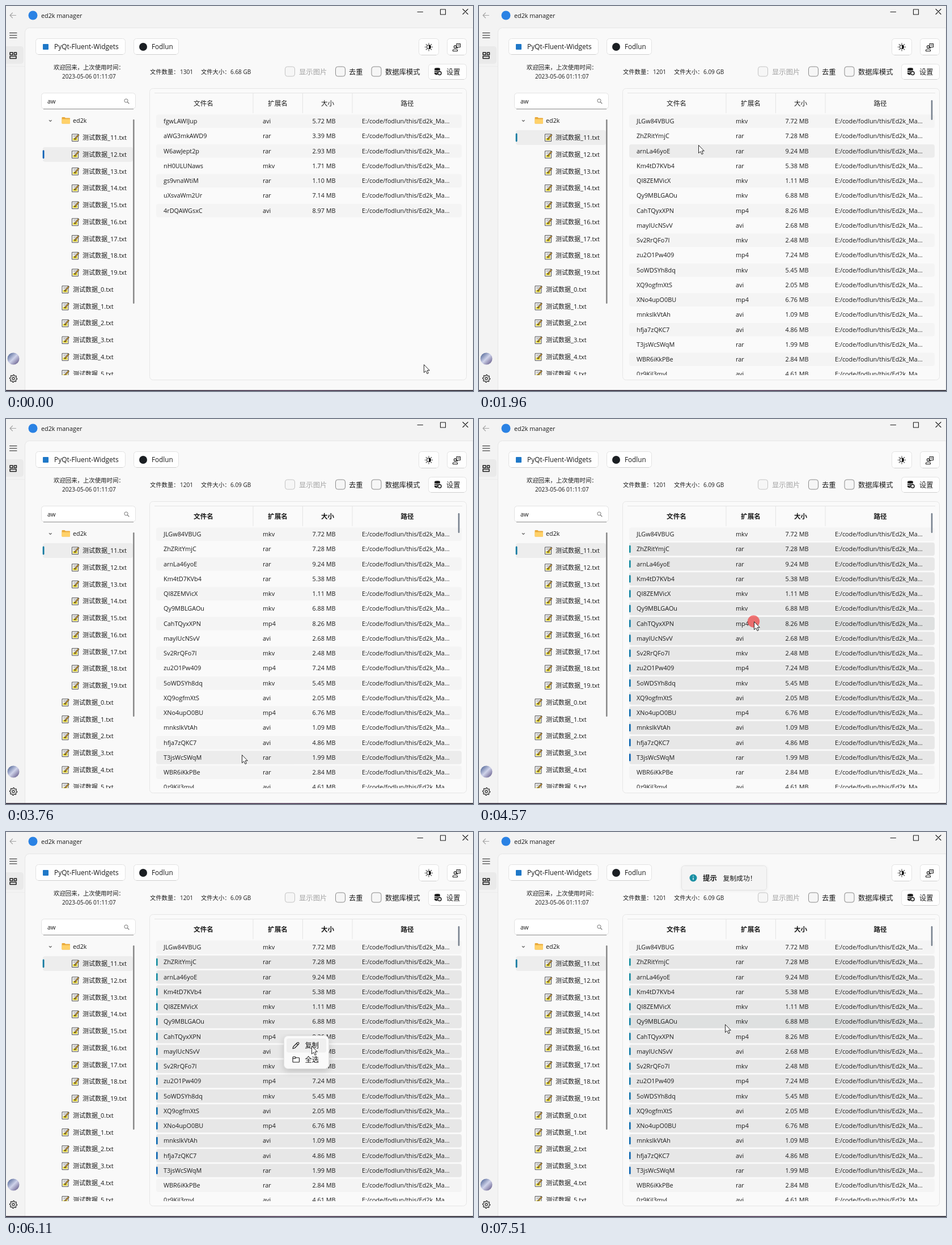
Animation, 824 px wide and 679 px high, one loop 8000 ms. Source, as an HTML page:

```html
<!DOCTYPE html>
<html lang="zh">
<head>
<meta charset="utf-8">
<title>ed2k manager</title>
<style>
html, body { margin: 0; width: 100%; height: 100%; overflow: hidden; background: #f3f3f3; }
svg { display: block; width: 824px; height: 679px; }
text { font-family: "Open Sans", "Noto Sans CJK SC", "Noto Sans CJK JP", "Noto Sans CJK", sans-serif; white-space: pre; }
.line { fill: none; stroke: #1c1c1c; stroke-width: 1.1; stroke-linecap: round; stroke-linejoin: round; }
.btn { fill: #fefefe; stroke: #e3e3e3; }
#panel { filter: drop-shadow(0 4px 6px rgba(0,0,0,.17)); }
#toastBox { filter: drop-shadow(0 1px 2px rgba(0,0,0,.06)); }
</style>
</head>
<body>
<svg id="stage" viewBox="0 0 824 679"></svg>
<script>
const LOOP = 8000, ROW = 26.25, TOP = 190.1, ITEM = 29.75;
const PATH = 'E:/code/fodlun/this/Ed2k_Ma...';
const before = `fgwLAWIJup avi 5.72|aWG3mkAWD9 rar 3.39|W6awJept2p rar 2.93|nH0ULUNaws mkv 1.71
gs9vnaWtiM rar 1.10|uXsvaWm2Ur rar 7.14|4rDQAWGsxC avi 8.97`;
const after = `JLGw84VBUG mkv 7.72|ZhZRitYmjC rar 7.28|arnLa46yoE rar 9.24|Km4tD7KVb4 rar 5.38
QI8ZEMVicX mkv 1.11|Qy9MBLGAOu mkv 6.88|CahTQyxXPN mp4 8.26|mayIUcNSvV avi 2.68
Sv2RrQFo7I mkv 2.48|zu2O1Pw409 mp4 7.24|5oWDSYh8dq mkv 5.45|XQ9ogfmXtS avi 2.05
XNo4upO0BU mp4 6.76|mnkslkVtAh avi 1.09|hfja7zQKC7 avi 4.86|T3jsWcSWqM rar 1.99
WBR6iKkPBe rar 2.84|0z9Kil3mvJ avi 4.61`;

const text = (x, y, s, size = 10.85, more = '') =>
  `<text x="${x}" y="${(y + size * .37).toFixed(2)}" font-size="${size}" fill="#1a1a1a" ${more}>${s}</text>`;
const rect = (x, y, w, h, r, more = '') =>
  `<rect x="${x}" y="${y}" width="${w}" height="${h}" rx="${r}" ${more}/>`;
const line = (d, more = '') => `<path class="line" d="${d}" ${more}/>`;
const disc = (x, y, r, fill, more = '') => `<circle cx="${x}" cy="${y}" r="${r}" fill="${fill}" ${more}/>`;
const button = (x, y, w, h) => rect(x + .5, y + .5, w - 1, h - 1, 5, 'class="btn"') +
  `<path d="M${x + 5} ${y + h - .5}h${w - 10}" stroke="#cfcfcf"/>`;
const mid = 'text-anchor="middle"';

function tableRows(src) {
  return src.split(/[|\n]/).map((r, i) => {
    const [name, ext, size] = r.split(' '), y = 203.2 + ROW * i;
    return text(278, y, name) + text(453, y, ext) + text(540.5, y, size + ' MB') + text(628, y, PATH);
  }).join('');
}

function gear(x, y) {
  let d = '';
  for (let i = 0; i < 32; i++) {
    const a = i * Math.PI / 16, r = i % 4 < 2 ? 6.6 : 5;
    d += (i ? 'L' : 'M') + (x + r * Math.cos(a)).toFixed(1) + ' ' + (y + r * Math.sin(a)).toFixed(1);
  }
  return line(d + 'Z') + disc(x, y, 2.1, 'none', 'class="line"');
}

function sun(x, y) {
  let d = '';
  for (let i = 0; i < 8; i++) {
    const c = Math.cos(i * Math.PI / 4), s = Math.sin(i * Math.PI / 4);
    d += `M${x + 5.6 * c} ${y + 5.6 * s}L${x + 6.6 * c} ${y + 6.6 * s}`;
  }
  return line(d) + disc(x, y, 3.5, 'none', 'class="line"') +
    `<path d="M${x} ${y - 3.5}a3.5 3.5 0 0 1 0 7z" fill="#1c1c1c"/>`;
}

const frame = () =>
  rect(0, 0, 824, 679, 0, 'fill="#f3f3f3"') +
  '<path d="M33.5 679V46.5a8 8 0 0 1 8-8H824V679z" fill="#f9f9f9" stroke="#e6e6e6"/>' +
  rect(0, 677.4, 824, 2, 0, 'fill="url(#strip)"') +
  line('M17.5 16.5H7M11.5 12L7 16.5L11.5 21', 'style="stroke:#a5a5a5"') +
  disc(47.5, 16.5, 8, '#2a82e4') + text(62, 16.7, 'ed2k manager', 10.8) +
  line('M726 10.5H735.5M766.5 6h9v9h-9zM806 5.5L815 14.5M815 5.5L806 14.5') +
  line('M6.5 47.5H19M6.5 51.7H19M6.5 56H19') +
  rect(-4, 71, 35, 31, 5, 'fill="#eaeaea"') + '<path d="M0 106.5H33" stroke="#ebebeb"/>' +
  line('M7 82h5v4h-5zM7 88.5h11v4h-11zM14.5 82h4v4h-4z', 'style="stroke-width:1.5"') +
  disc(13, 622, 10.5, 'url(#avatar)') + gear(13, 657);

const toolbar = () =>
  button(52, 57, 159, 29) + rect(65, 67, 10, 10, 1, 'fill="#1f78c8"') + text(85, 71.7, 'PyQt-Fluent-Widgets', 11.95) +
  button(225, 57, 80, 29) + disc(242, 72, 7, '#1b1f23') + text(257, 71.7, 'Fodlun', 11.7) +
  button(728, 57, 36, 30) + sun(746, 72.3) +
  button(778, 57, 35, 30) +
  line('M795 66.5h6.5v6h-4l-2 2v-2h-.5zM797 69h3') + disc(792.5, 72, 2.1, 'none', 'class="line"') +
  line('M788.5 79.5v-1.5q0-2 4-2t4 2v1.5z') +
  text(84, 108.6, '欢迎回来，上次使用时间：', 10.4) + text(99, 124, '2023-05-06 01:11:07', 10.05) +
  text(254, 116, '文件数量：', 10.3) + text(307, 116, '1301', 10.05, 'id="count"') +
  text(344, 116, '文件大小：', 10.3) + text(396, 116, '6.68 GB', 10, 'id="total"') +
  [[492.5, '显示图片', 517], [581.5, '去重', 605], [645, '数据库模式', 669]].map(([x, s, tx], i) =>
    rect(x, 107, 17, 17, 4, `fill="#f6f6f6" stroke="${i ? '#8a8a8a' : '#c4c4c4'}"`) +
    text(tx, 116, s, 12.35, i ? '' : 'style="fill:#a3a3a3"')).join('') +
  button(745, 102, 68, 28) +
  '<path d="M756 111.5v7.5q0 2 5 2.5l1-5 4-1v-4z" fill="#1c1c1c"/><ellipse cx="761" cy="111" rx="5" ry="2" fill="#1c1c1c"/>' +
  line('M756.5 113.5q4.5 2.5 9 0M756.5 116.5q3 1.5 5 1', 'style="stroke:#fff"') +
  disc(765, 118.5, 3, '#fff', 'stroke="#1c1c1c" stroke-width="1.5"') + text(777, 116, '设置', 12.2);

function tree() {
  let s = rect(62.5, 153.5, 166, 28, 5, 'fill="#fff" stroke="#e3e3e3"') +
    '<path d="M66 181.7H225" stroke="#8c8c8c"/>' + text(73, 168, 'aw', 11) +
    disc(212, 167, 3.1, 'none', 'stroke="#777"') + line('M214.5 169.5L217 172', 'style="stroke:#777"') +
    '<g clip-path="url(#treeClip)">' +
    rect(65, 0, 159, 26, 4, 'id="treeHover" fill="#f1f1f1"') +
    `<g id="picked">${rect(65, 219, 159, 26, 4, 'fill="#ededed"')}${rect(64.7, 224.5, 2.8, 15, 1.4, 'id="pickBar"')}</g>` +
    line('M76.3 201.5l2 2 2-2', 'style="stroke:#666"') +
    '<path d="M98.5 197q0-1 1-1h4l1.5 1.5h7q1 0 1 1v8q0 1-1 1h-12.5q-1 0-1-1z" fill="#e9a93a"/>' +
    '<path d="M98.5 199.5h14.5v7q0 1-1 1h-12.5q-1 0-1-1z" fill="#ffd169"/>' +
    text(118, 202.3, 'ed2k', 10.8);
  for (let i = 1; i < 16; i++) {
    const y = 202.3 + ITEM * i, deep = i < 10;
    s += `<use href="#note" x="${deep ? 116 : 98.5}" y="${y - 7.5}"/>` +
      text(deep ? 135 : 118, y, '测试数据_' + (deep ? 10 + i : i - 10) + '.txt', 11);
  }
  return s + '</g>' + rect(224, 200, 2.6, 325, 1.3, 'fill="#8b8b8b"');
}

function table() {
  let s = rect(253.5, 145.5, 559, 514, 6, 'fill="#fafafa" stroke="#e6e6e6"') +
    '<path d="M262 153.5H805M436 154V189M523.5 154V189M611 154V189" stroke="#e4e4e4"/><g id="head">' +
    [[348.5, '文件名'], [479.5, '扩展名'], [567.5, '大小'], [708, '路径']]
      .map(([x, t]) => text(x, 171.7, t, 11.6, mid)).join('') +
    '</g><g clip-path="url(#tableClip)">';
  for (let i = 0; i < 18; i++) {
    const y = 191.4 + ROW * i, k = i / 16;
    const tone = `rgb(${16 - 12 * k},${142 - 50 * k},${156 + 22 * k})`;
    s += rect(265, y, 539, 23.6, 4, 'class="bg"') +
      rect(265, y + 5.2, 2.6, 13.2, 1.3, `class="bar" fill="${tone}"`);
  }
  return s + `<g id="before">${tableRows(before)}</g><g id="after">${tableRows(after)}</g></g>` +
    rect(797.7, 166, 2.6, 35, 1.3, 'id="scroll" fill="#78828f"');
}

const overlay = () =>
  '<g id="menu" clip-path="url(#menuClip)"><g id="panel">' +
  rect(490.5, 359.5, 79, 58, 7, 'fill="#fafafa" stroke="#e2e2e2"') +
  rect(495, 364, 70, 25, 4, 'id="menuHover" fill="#efefef"') +
  line('M506 382l1-3.5 7-7q1.5-1 2.5 0t0 2.5l-7 7zM512.5 373l2.5 2.5') + text(527.5, 376.7, '复制', 12.2) +
  line('M506 397.5q0-1 1-1h3l1.5 1.5h5q1 0 1 1v6q0 1-1 1h-9.5q-1 0-1-1zM506 399.5h4.5l1-1.5') +
  text(527.5, 401.7, '全选', 12.2) + '</g></g>' +
  '<g id="toast"><g id="toastBox">' + rect(357.5, 59.5, 150, 43, 5, 'fill="#f4f4f4" stroke="#e3e3e3"') + '</g>' +
  disc(378, 81, 6.5, '#1a8fa3') + '<path d="M378 80.5v4M378 77.3v1.4" stroke="#fff" stroke-width="1.3"/>' +
  text(395, 81.3, '提示', 12.4, 'font-weight="700"') + text(430.5, 81.3, '复制成功！', 11.8) + '</g>' +
  disc(0, 0, 10.7, '#fff', 'id="press"') +
  '<path id="arrow" d="M.5 .5V14.5L3.8 11.5L6 16.5L8.3 15.5L6.2 10.7H10.3Z" fill="#fff" stroke="#111" stroke-width=".9"/>';

const defs = `<defs>
<clipPath id="treeClip"><rect x="60" y="186" width="170" height="465"/></clipPath>
<clipPath id="tableClip"><rect x="260" y="190" width="546" height="461"/></clipPath>
<clipPath id="menuClip"><rect x="474" y="356" width="112" height="82"/></clipPath>
<linearGradient id="avatar" x2="1" y2="1"><stop stop-color="#3d5488"/><stop offset=".5" stop-color="#cfd3ea"/><stop offset="1" stop-color="#564a7c"/></linearGradient>
<linearGradient id="strip"><stop stop-color="#241c2c"/><stop offset=".35" stop-color="#2b2233"/><stop offset=".6" stop-color="#4a3350"/><stop offset="1" stop-color="#1d1a24"/></linearGradient>
<g id="note"><path d="M.5 1.5H11.5V14H.5Z" fill="#fff" stroke="#4a4a4a"/>
<path d="M2 8.5h8v4h-8z" fill="#e2d43c"/><path d="M2.5 4h6M2.5 6h4" stroke="#9a9a9a"/>
<path d="M5 10.5L12.5 2" stroke="#3c3320" stroke-width="2.6"/><path d="M6 9.5L12 2.7" stroke="#e3a93a" stroke-width="1.2"/></g>
</defs>`;

const stage = document.getElementById('stage');
stage.innerHTML = defs + frame() + toolbar() + tree() + table() + overlay();
const el = id => document.getElementById(id);
const bgs = stage.querySelectorAll('.bg'), bars = stage.querySelectorAll('.bar');

// Pointer keys: time, x, y, 1 = eased arrival
const keys = [
  [20, 737, 632], [450, 150, 212, 1], [600, 150, 212], [1210, 168, 229, 1], [1450, 168, 229],
  [1900, 384, 245, 1], [1960, 387, 245], [2060, 387, 245], [2120, 391, 246], [2220, 391, 246],
  [2300, 404, 232], [2450, 404, 232], [2820, 407, 362], [3160, 411, 465], [3260, 411, 465],
  [3550, 416, 592], [3820, 416, 592], [4380, 485, 357, 1], [4590, 485, 357], [4880, 489, 376, 1],
  [5200, 490, 361, 1], [5600, 490, 361], [6110, 539, 377, 1], [6440, 539, 377],
  [6780, 455, 351, 1], [7120, 455, 351], [7510, 434, 339, 1]
];
// Button held: from, to, colour
const presses = [[1370, 1460, '#fff000'], [2450, 3760, '#fff000'], [4570, 5350, '#f02828'], [6360, 6440, '#fff000']];

const clamp = v => Math.min(1, Math.max(0, v));
const out = v => 1 - (1 - v) ** 2;

function pointer(t) {
  const i = keys.findIndex(k => k[0] > t);
  if (i === 0) return keys[0].slice(1, 3);
  if (i < 0) return keys[keys.length - 1].slice(1, 3);
  const a = keys[i - 1], b = keys[i];
  let p = (t - a[0]) / (b[0] - a[0]);
  if (b[3]) p = p * p * (3 - 2 * p);
  return [a[1] + (b[1] - a[1]) * p, a[2] + (b[2] - a[2]) * p];
}

const show = (id, on) => el(id).setAttribute('display', on ? 'inline' : 'none');
const move = (id, x, y) => el(id).setAttribute('transform', `translate(${x.toFixed(2)} ${y.toFixed(2)})`);

function draw(t) {
  const [x, y] = pointer(t), [hx, hy] = pointer(Math.max(0, t - 50));
  const picked = t >= 1390, loaded = t >= 1450, chosen = t >= 3780;
  const menu = t >= 5370 && t < 6440;

  move('arrow', x, y);
  const press = presses.find(p => t >= p[0] && t < p[1]);
  show('press', press);
  if (press) {
    move('press', x - .5, y);
    el('press').setAttribute('fill', press[2]);
    el('press').setAttribute('fill-opacity', .62);
  }

  const item = Math.floor((hy - 187.4) / ITEM);
  show('treeHover', hx > 65 && hx < 224 && item >= 0 && item < 16);
  el('treeHover').setAttribute('y', 189.3 + ITEM * item);
  move('picked', 0, picked ? 0 : ITEM);
  el('pickBar').setAttribute('fill', picked ? '#1279a0' : '#0a5fb4');

  el('count').textContent = loaded ? '1201' : '1301';
  el('total').textContent = loaded ? '6.09 GB' : '6.68 GB';
  show('before', !loaded);
  show('after', loaded);
  show('scroll', loaded);
  el('head').setAttribute('font-weight', t >= 2450 ? 700 : 400);

  const over = !menu && hx > 265 && hx < 804 && hy < 651 ? Math.floor((hy - TOP) / ROW) : -1;
  bgs.forEach((bg, i) => {
    const sel = chosen && i > 0 && i < 16, hover = i === over;
    const there = loaded || i < 7;
    bg.setAttribute('fill', !there ? 'none' : sel ? (hover ? '#dee0e0' : '#e7e7e7')
      : hover ? '#ececec' : i % 2 ? 'none' : '#f4f4f4');
    bars[i].setAttribute('display', sel ? 'inline' : 'none');
  });

  show('menu', menu);
  move('panel', 0, -30 * (1 - out(clamp((t - 5370) / 250))));
  show('menuHover', x > 495 && x < 565 && y > 364 && y < 389);

  const rise = clamp((t - 6460) / 200);
  show('toast', rise > 0);
  move('toast', 0, -11 * (1 - out(rise)));
}

function tick() {
  draw(performance.now() % LOOP);
  requestAnimationFrame(tick);
}
tick();
</script>
</body>
</html>
```
